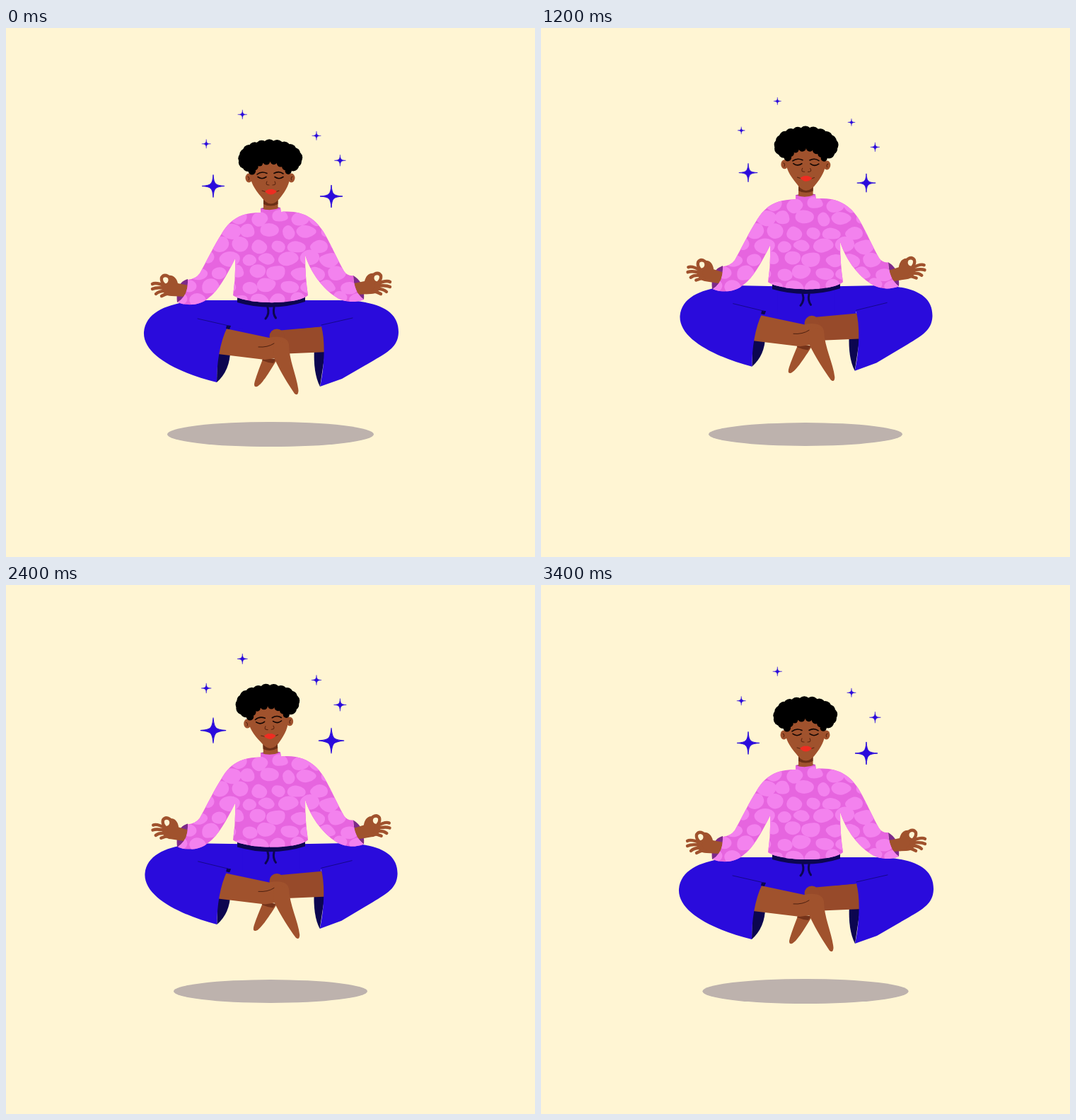
Animation of 748 by 748 pixels, one loop 3500 ms. Source, as an HTML page:

```html
<!DOCTYPE html>
<html lang="en">
<head>
<meta charset="utf-8">
<title>Floating meditation</title>
<style>
  html, body { margin: 0; width: 100%; height: 100%; overflow: hidden; background: #fff5d3; }
  svg { display: block; width: 100%; height: 100%; }
  .line { fill: none; stroke-linecap: round; stroke-linejoin: round; }
</style>
</head>
<body>
<svg viewBox="0 0 748 748">
  <defs>
    <clipPath id="shirtClip"><use href="#shirt"/></clipPath>
    <g id="hand">
      <g id="wrist" fill="#a0522d">
        <path d="M258 364L243 361C241 353 236 349 230 350L220 366Q222 379 234 379L255 380Z"/>
        <ellipse cx="225" cy="356.500" rx="4.500" ry="4.800" fill="#fff5d3"/>
        <g class="line" stroke="#a0522d" stroke-width="4.400">
          <path d="M229 351Q223 348 220 353Q219 358 223 362"/>
          <path d="M226 365Q212 359 207 362M226 368Q213 366 207 369M228 372Q217 371 212 376M231 375Q225 376 220 379"/>
        </g>
      </g>
    </g>
  </defs>

  <ellipse id="shadow" cx="374" cy="574.5" fill="#bdb2ad"/>
  <g id="stars" fill="#2a0bdc" stroke="#2a0bdc" stroke-width=".06" stroke-linejoin="round"></g>

  <g id="body">
    <path fill="#2a0bdc" d="M310 385H440L447 430L385 442H372L310 430Z"/>
    <g class="left" fill="#0c0650"><path d="M299 450L317 456Q317 484 298 501Z"/></g>
    <g class="right" fill="#0c0650"><path d="M436 452L452 454L444 507Q434 488 436 452Z"/></g>

    <path fill="#974a2a" d="M383 428L455 421.500V458L385 461Z"/>
    <g id="backFoot">
      <path fill="#a0522d" d="M364 466L383 469C374 484 362 504 355 507Q349 509 352 499Q356 486 364 466Z"/>
      <path fill="#74331a" d="M364 466L382 468L378 474Q369 473 362 470Z"/>
    </g>
    <circle cx="383" cy="436" r="10.5" fill="#974a2a"/>
    <path fill="#a0522d" d="M306 424L372 438C386 435 400 437 400 449L386 466L366 469L296 460.500Z"/>
    <path id="frontFoot" fill="#a0522d" d="M379 440L400 447C400 470 412 494 413.500 513Q413 521 408 517C400 505 387 485 378 464Z"/>
    <path class="line" stroke="#4d2010" d="M357 451Q370 452 379 446"/>

    <g class="left">
      <path fill="#2a0bdc" d="M335 385H285C242 386 198 396 195 430C193 463 245 488 298 501C298 475 302 445 313 423L335 425Z"/>
      <path fill="#0c0650" d="M312 420L318 421L316 426L311 425Z"/>
      <path class="line" stroke="#16088a" d="M271 411L315 421"/>
    </g>
    <g class="right">
      <path fill="#2a0bdc" d="M415 385H470C527 385 556 400 555 431C554 451 540 458 520 470L475 496L444 507C450 480 452 445 446 422L415 425Z"/>
      <path class="line" stroke="#16088a" d="M446 420L490 410"/>
    </g>

    <path fill="#0c0650" d="M327 378H423V387Q375 402 327 388Z"/>
    <path class="line" stroke="#0c0650" stroke-width="3" d="M370 395Q373 404 367 411M379 395Q377 404 381.500 410"/>

    <path fill="#7d2a8a" d="M257 355Q239 360 242 388Q258 380 257 355ZM491 350Q508 360 506 384Q492 374 491 350Z"/>
    <use href="#hand"/>
    <use href="#hand" transform="translate(750 -3) scale(-1 1)"/>

    <path fill="#a33fa0" d="M360 255Q374 251 388 254V260H360Z"/>
    <g id="head">
      <path fill="#a0522d" d="M364 232H384.500V260H364Z"/>
      <path fill="#6b2f16" d="M364 243H384.500V249Q374 254 364 249Z"/>
      <ellipse cx="373.500" cy="184" rx="41" ry="22"/>
      <g fill="#a0522d">
        <ellipse cx="343.500" cy="212" rx="5" ry="6.500"/>
        <ellipse cx="403.500" cy="212" rx="5" ry="6.500"/>
        <path d="M345 204Q373 174 402 204C402 216 399 225 390 237Q375 259 361 239C351 227 345 218 345 204Z"/>
      </g>
      <g id="hair"></g>
      <g class="line" stroke="#120603" stroke-width="1.600">
        <path d="M355 207Q361 202 369 205.500M379 205.500Q386 201.500 392 206"/>
        <path d="M356 210.500Q362 215 368 210.500M380 210.500Q386 215 392 210.500"/>
        <path stroke="#5a2510" stroke-width="1.100" d="M369 217Q366 222 372 222M380 217Q383 222 377 222M362 230L367 231.500M382 231.500L386 230M342 210Q345 212 343 215M405 210Q402 212 404 215"/>
      </g>
      <path fill="#ee2d22" d="M366 231Q372 226.500 374.500 228Q377 226.500 383 231Q374.500 240 366 231Z"/>
    </g>

    <path id="shirt" fill="#e665df" d="M360 255Q374 260 388 254L389 260C420 257 438 270 450 290C461 309 469 328 478 344Q483 351 491 350Q492 374 506 384C490 390 475 387 463 378C446 366 430 344 423 321Q423 352 427 378C410 392 340 391 321 378Q325 352 324 326C312 350 300 372 286 382C274 393 255 393 243 388Q258 378 257 356Q268 355 274 347C284 329 295 306 306 289C317 271 332 261 360 261Z"/>
    <path id="spots" fill="#f382ee" clip-path="url(#shirtClip)"/>
  </g>
</svg>

<script>
const LOOP = 3500, STEP = 100, TAU = Math.PI * 2;
const $ = id => document.getElementById(id);
const set = (el, attrs) => Object.entries(attrs).forEach(([k, v]) => el.setAttribute(k, v));
const add = (parent, tag, attrs) => {
  const el = document.createElementNS('http://www.w3.org/2000/svg', tag);
  set(el, attrs);
  return parent.appendChild(el);
};

let seed = 7;
const random = () => (seed = seed * 16807 % 2147483647) / 2147483647;
const jitter = size => (random() - 0.5) * 2 * size;

// A row of curls along an elliptic arc, angles in half turns
function curls(n, cx, cy, rx, ry, from, to, r) {
  for (let i = 0; i < n; i++) {
    const a = Math.PI * (from + (to - from) * i / (n - 1));
    add($('hair'), 'circle', { cx: cx + rx * Math.cos(a), cy: cy + ry * Math.sin(a), r: r + jitter(0.6) });
  }
}
curls(15, 373.5, 185, 37, 19, 0.82, 2.16, 8.5);
curls(8, 373.5, 205, 26, 17, 1.05, 1.95, 5);

// Closed smooth curve around a centre with an uneven radius
function blob(x, y, w, h) {
  const n = 7, turn = random() * TAU;
  const pts = Array.from({ length: n }, (_, i) => {
    const a = i / n * TAU + turn, r = 1.1 + jitter(0.17);
    return [x + w * r * Math.cos(a), y + h * r * Math.sin(a)];
  });
  const mid = i => pts[i % n].map((v, k) => (v + pts[(i + 1) % n][k]) / 2);
  return 'M' + mid(0) + pts.map((_, i) => `Q${pts[(i + 1) % n]} ${mid(i + 1)}`).join('') + 'Z';
}

let spots = '';
for (let row = 0; row < 7; row++)
  for (let x = 245 + row % 2 * 14; x < 510; x += 28)
    spots += blob(x + jitter(3), 268 + row * 19.5 + jitter(3), 12 + jitter(2.5), 9.5 + jitter(1.5));
set($('spots'), { d: spots });

// Sparkles: x, y, size
const stars = [
  [334.3, 122.3, 6.6], [283.2, 163.8, 6.4], [439, 152.3, 6.4],
  [472.4, 187.3, 8], [293, 223.5, 16], [460, 238, 16]
].map(([x, y, size]) => ({
  x, y, size,
  el: add($('stars'), 'path', {
    d: 'M0-1C.07-.17 .17-.07 1 0C.17 .07 .07 .17 0 1C-.07 .17-.17 .07-1 0C-.17-.07-.07-.17 0-1Z'
  })
}));

const clamp = x => Math.min(1, Math.max(0, x));
const smooth = x => x * x * (3 - 2 * x);
const steep = x => x < 0.5 ? (2 * x) ** 2.5 / 2 : 1 - (2 - 2 * x) ** 2.5 / 2;

// Smooth interpolation between [time, value] pairs
function keyed(t, keys) {
  const i = Math.max(1, keys.findIndex(k => k[0] >= t));
  const [t0, a] = keys[i - 1], [t1, b] = keys[i];
  return a + (b - a) * smooth((t - t0) / (t1 - t0));
}

function draw(t) {
  const lift = steep(clamp(t / 1700)) - steep(clamp((t - 1850) / 1650));
  const wave = 0.5 - 0.5 * Math.cos(TAU * t / 3600);
  const tilt = keyed(t, [[0, 0], [750, 2], [2450, -3.1], [3400, 0], [LOOP, 0]]);
  const pulse = keyed(t, [[0, 1], [1000, 0.8], [2200, 1.12], [3400, 1], [LOOP, 1]]);

  const move = (id, transform) => set($(id), { transform });
  move('body', `translate(0 ${-21.5 * lift})`);
  move('head', `rotate(${tilt} 374 255)`);
  move('wrist', `rotate(${7.5 * lift} 253 371)`);
  move('backFoot', `rotate(${2 * lift} 374 460)`);
  move('frontFoot', `rotate(${-1.8 * lift} 388 445)`);
  set($('shadow'), { rx: 146 - 12 * wave, ry: 17.6 - 1.6 * wave });

  // Knees rise a little more than the hips
  for (const [side, hip, dir] of [['left', 330, 1], ['right', 418, -1]]) {
    const transform = `translate(${hip} ${385 - 1.4 * lift}) skewY(${1.2 * dir * lift}) ` +
      `scale(${1 - 0.013 * lift} ${1 - 0.018 * lift}) translate(${-hip} -385)`;
    document.querySelectorAll('.' + side).forEach(el => set(el, { transform }));
  }

  for (const { el, x, y, size } of stars)
    set(el, { transform: `translate(${x} ${y - 21.8 * lift}) scale(${size * pulse})` });
}

function tick() {
  draw(Math.floor(performance.now() % LOOP / STEP) * STEP);
  requestAnimationFrame(tick);
}
tick();
</script>
</body>
</html>
```
